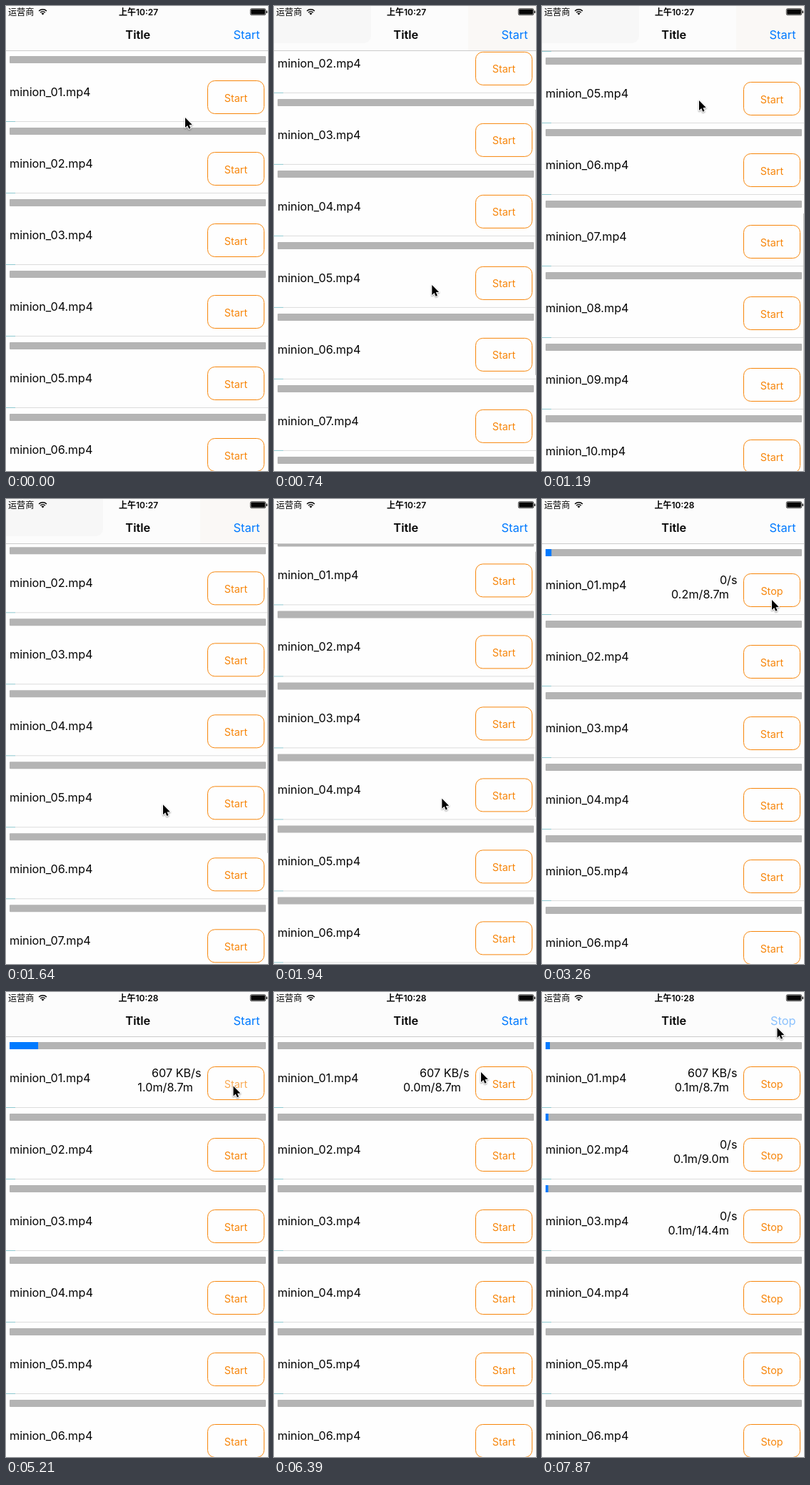
These frames come from a looping animation (367 by 650 pixels, 8 s). An HTML page with a canvas:

```html
<!DOCTYPE html>
<html lang="zh">
<head>
<meta charset="utf-8">
<title>Download list</title>
<style>
html, body { margin: 0; width: 100%; height: 100%; overflow: hidden; background: #fff; }
canvas { display: block; width: 367px; height: 650px; }
</style>
</head>
<body>
<canvas id="stage"></canvas>
<script>
const W = 367, H = 650, LOOP = 8000, STEP = 148.4, LAST = 53;
const NAV = 62, ROW = 100, ROWS = 10;
const BLUE = '#007aff', ORANGE = '#f7860b', BLACK = '#050505';
const CJK = '"Noto Sans CJK SC", "Noto Sans CJK", sans-serif';
const SANS = 'Inter, ' + CJK;

// Moments of the story, counted in steps.
const GRAB = 3, RELEASE = 12, PRESS = 20, STOP = 34, RESET = 42, START_ALL = 52;
const GRAB_Y = 530, RELEASE_Y = 482;
const TOTALS = [8.7, 9, 14.4];

const canvas = document.getElementById('stage');
const ctx = canvas.getContext('2d');
const dpr = window.devicePixelRatio || 1;
canvas.width = W * dpr;
canvas.height = H * dpr;

// The pointer rests between these eased moves.
const moves = [
  { from: 0, to: GRAB, x: 222, y: GRAB_Y },
  { from: GRAB, to: 8, x: 220, y: 132 },
  { from: 8, to: RELEASE, x: 220, y: RELEASE_Y },
  { from: RELEASE, to: 15, x: 279, y: 238 },
  { from: 15, to: 19, x: 322, y: 141 },
  { from: 24, to: 27, x: 324, y: 151 },
  { from: 28, to: STOP, x: 318.5, y: 131.5 },
  { from: 37, to: 41, x: 290, y: 112 },
  { from: 44, to: 50, x: 329.5, y: 50 }
];

const clamp = u => Math.max(0, Math.min(1, u));
const smooth = u => u * u * (3 - 2 * u);

function pointer(k) {
  let x = 251, y = 156;
  for (const m of moves) {
    const u = smooth(clamp((k - m.from) / (m.to - m.from)));
    x += (m.x - x) * u;
    y += (m.y - y) * u;
  }
  return { x, y };
}

// The list follows the pointer while held, then bounces to rest.
function scrollAt(k) {
  if (k < GRAB) return 0;
  if (k <= RELEASE) return GRAB_Y - pointer(k).y;
  const n = k - RELEASE;
  return (GRAB_Y - RELEASE_Y) * Math.exp(-0.9 * n) * Math.cos(0.8 * n);
}

function rect(x, y, w, h, color) {
  ctx.fillStyle = color;
  ctx.fillRect(x, y, w, h);
}

function round(x, y, w, h, r) {
  ctx.beginPath();
  ctx.roundRect(x, y, w, h, r);
}

function text(str, x, y, size, { color = BLACK, align = 'left', weight = 400, alpha = 1, family = SANS } = {}) {
  ctx.font = `${weight} ${size}px ${family}`;
  ctx.textAlign = align;
  ctx.fillStyle = color;
  ctx.globalAlpha = alpha;
  ctx.fillText(str, x, y);
  ctx.globalAlpha = 1;
}

function rowState(i, k) {
  const first = i === 0;
  const running = k >= START_ALL || (first && k > PRESS && k < STOP);
  const s = { label: running ? 'Stop' : 'Start', alpha: 1, speed: '0/s', done: 0 };
  s.total = (first && k > PRESS) || k > START_ALL ? TOTALS[i] : 0;
  if (k > START_ALL) s.done = i === 1 ? 0.1 : 0.147;
  else if (k < RESET) s.done = Math.min(0.97, 0.2 + 0.09 * (k - 22));
  s.done = Math.max(0, s.done);
  if (first) {
    if (k >= 24) s.speed = '607 KB/s';
    if (k === PRESS || k === STOP) s.alpha = 0.35;
    if (k === STOP + 1) s.alpha = 0.7;
  }
  return s;
}

function drawRow(i, y, k) {
  const s = rowState(i, k);
  round(5, y + 8, 359, 10, 1);
  ctx.fillStyle = '#b4b4b4';
  ctx.fill();
  if (s.total) {
    rect(5, y + 8, 359 * s.done / s.total, 10, BLUE);
    text(s.speed, 273.5, y + 57, 16.2, { align: 'right' });
    text(`${s.done.toFixed(1)}m/${s.total.toFixed(1)}m`, 262, y + 77, 16.2, { align: 'right' });
  }
  text(`minion_${String(i + 1).padStart(2, '0')}.mp4`, 5, y + 64, 16.2);
  round(282.5, y + 42.5, 79, 46, 10);
  ctx.strokeStyle = ORANGE;
  ctx.lineWidth = 1;
  ctx.stroke();
  text(s.label, 322, y + 71.5, 14.4, { color: ORANGE, align: 'center', alpha: s.alpha });
  rect(13, y + 99, W - 13, 1, '#dcdcdc');
  rect(0, y + 99, 13, 1, '#8fc9d0');
}

function drawList(k, scroll) {
  for (let i = 0; i < ROWS; i++) {
    const y = NAV + i * ROW - scroll;
    if (y > -ROW && y < H) drawRow(i, y, k);
  }
  ctx.globalAlpha = k > GRAB ? clamp((19 - k) / 3) : 0;
  rect(366, 66 + 0.563 * Math.max(0, scroll), 1, 371, '#bdbdbd');
  ctx.globalAlpha = 1;
}

function drawWifi(x, y) {
  const fan = r => {
    ctx.beginPath();
    ctx.arc(x, y, r, -Math.PI * 0.75, -Math.PI * 0.25);
  };
  ctx.strokeStyle = ctx.fillStyle = BLACK;
  ctx.lineWidth = 1.6;
  for (const r of [4.6, 7.6]) {
    fan(r);
    ctx.stroke();
  }
  fan(2.8);
  ctx.lineTo(x, y);
  ctx.fill();
}

function drawBattery() {
  ctx.strokeStyle = ctx.fillStyle = BLACK;
  ctx.lineWidth = 0.7;
  round(342.3, 3.7, 21.4, 9, 1.8);
  ctx.stroke();
  round(343.2, 4.6, 19.6, 7.2, 0.8);
  ctx.fill();
  rect(364.6, 6.6, 1.4, 3.4, BLACK);
}

function drawNav(k, scroll) {
  rect(0, 0, W, NAV, '#fcfcfc');
  if (scroll > 60) {
    round(-20, -20, 156, 72, 10);
    ctx.fillStyle = '#f7f7f7';
    ctx.fill();
    rect(272, 0, W - 272, NAV, '#faf8f6');
  }
  rect(0, NAV, W, 1, '#cbcbcb');
  text('运营商', 3, 12.7, 12.1, { family: CJK });
  drawWifi(51.5, 12.4);
  text(k < PRESS ? '上午10:27' : '上午10:28', 185.5, 12.6, 12, { align: 'center', weight: 600 });
  drawBattery();
  text('Title', 184.8, 46, 16.4, { align: 'center', weight: 600 });
  const alpha = k < START_ALL - 1 ? 1 : k < LAST ? 0.25 : 0.45;
  text(k >= START_ALL ? 'Stop' : 'Start', 355.5, 46, 16.4, { color: BLUE, align: 'right', alpha });
}

function drawCursor({ x, y }) {
  ctx.save();
  ctx.translate(x, y);
  const arrow = new Path2D('M0 0V14L3.2 11 5.3 15.8 7.6 14.8 5.5 10.2 9.8 10Z');
  ctx.shadowColor = 'rgba(0,0,0,0.4)';
  ctx.shadowBlur = 2 * dpr;
  ctx.shadowOffsetY = dpr;
  ctx.strokeStyle = '#fff';
  ctx.lineWidth = 2;
  ctx.lineJoin = 'round';
  ctx.stroke(arrow);
  ctx.shadowColor = 'transparent';
  ctx.fillStyle = '#000';
  ctx.fill(arrow);
  ctx.restore();
}

function draw(ms) {
  const k = Math.min(LAST, Math.floor((ms % LOOP + 5) / STEP));
  const scroll = scrollAt(k);
  ctx.setTransform(dpr, 0, 0, dpr, 0, 0);
  rect(0, 0, W, H, '#fefefe');
  drawList(k, scroll);
  drawNav(k, scroll);
  drawCursor(pointer(k));
}

const start = performance.now();
function tick() {
  draw(performance.now() - start);
  requestAnimationFrame(tick);
}
tick();
</script>
</body>
</html>
```
